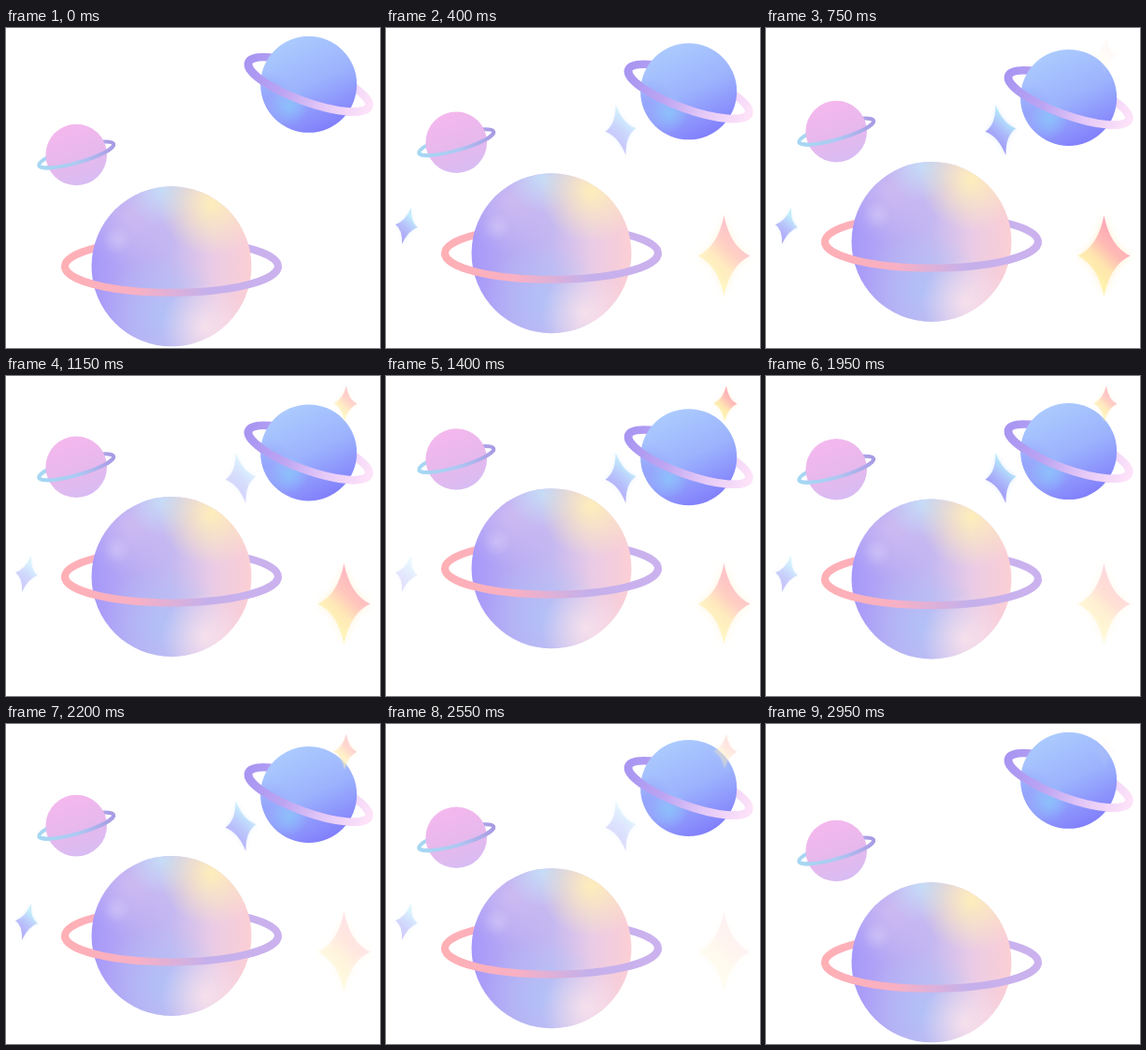
Write an HTML page with a canvas that moves like this. It is 400 px wide and 342 px high and loops after 3000 ms.

```html
<!DOCTYPE html>
<html lang="en">
<head>
<meta charset="utf-8">
<title>Floating planets</title>
<style>
html, body { margin: 0; width: 100%; height: 100%; overflow: hidden; background: #fff; }
canvas { display: block; }
</style>
</head>
<body>
<canvas id="stage" width="400" height="342"></canvas>
<script>
const ctx = document.getElementById('stage').getContext('2d');
const LOOP = 3000, STEP = 50, TURN = 1530, REST = 2950;

// Glows are [x, y, radius, colour] in units of the planet's radius.
const planets = [
  {
    x: 75.2, y: 135.5, r: 32.8, drift: -50.8,
    shade: 70, colors: ['#f4b8ee', '#e8b8ec', '#d8bcf3'], glows: [],
    ring: { rx: 41.5, ry: 8.5, width: 4, tilt: -16, colors: ['#a5d8f3', '#adc8f2', '#a99ae4'] }
  },
  {
    x: 323.7, y: 60.3, r: 51.5, drift: 28.8,
    shade: 65, colors: ['#abcafe', '#9cb3fd', '#817ffb'],
    glows: [[-.9, .3, .6, '#8e96fa90'], [-.4, .45, .4, '#8ac8fac0']],
    ring: { rx: 68.5, ry: 18.5, width: 8.5, tilt: 20, colors: ['#a896f2', '#bda4f2', '#e4c8f7', '#fde2f9'] }
  },
  {
    x: 177, y: 254.8, r: 85.5, drift: -53.7,
    shade: 0, colors: ['#a698fa', '#b7aaf3', '#c4b8f1', '#e9cbe6', '#fccfd4'],
    glows: [
      [-.5, -.65, .65, '#d2bff1c0'], [-.12, -.95, .45, '#c6e4f8d0'],
      [.5, -.78, .65, '#fff0b8f0'], [-.1, .6, .75, '#abc5f9b0'],
      [.42, .75, .55, '#ffe8ecc0'], [-.68, -.33, .18, '#ffffff38']
    ],
    ring: { rx: 114, ry: 28, width: 8, tilt: 0, colors: ['#ffb0b5', '#f8b0c4', '#c5b0eb', '#cbb2ee'] }
  }
];

const cool = ['#9d94f6', '#a9b8fa', '#b2eafa'];
const warm = ['#fff2a2', '#ffe3a8', '#ffb3b0', '#fd9cae'];
const noDip = { at: 0, span: 1, depth: 0 };
const stars = [
  { x: 251, y: 109, w: 16.5, h: 27, lean: 5.5, colors: cool, glow: '#dceaff',
    peak: .95, start: 0, rise: 750, end: 2850, fall: 900, dip: { at: 1150, span: 400, depth: .6 } },
  { x: 22, y: 211.5, w: 12, h: 19.5, lean: -5, colors: cool, glow: '#dceaff',
    peak: .85, start: 0, rise: 450, end: 2850, fall: 600, dip: { at: 1500, span: 900, depth: .8 } },
  { x: 361.5, y: 243.5, w: 28, h: 43.5, lean: 0, colors: warm, glow: '#ffeec4',
    peak: .85, start: 0, rise: 600, end: 2850, fall: 2100, dip: noDip },
  { x: 363, y: 29.5, w: 12.5, h: 19, lean: -1, colors: warm, glow: '#ffeec4',
    peak: .78, start: 700, rise: 700, end: 3000, fall: 1400, dip: noDip }
];

function gradient(x0, y0, x1, y1, colors) {
  const g = ctx.createLinearGradient(x0, y0, x1, y1);
  colors.forEach((c, i) => g.addColorStop(i / (colors.length - 1), c));
  return g;
}

function drawRing({ rx, ry, width, tilt, colors }, start, end) {
  ctx.save();
  ctx.rotate(tilt * Math.PI / 180);
  ctx.lineWidth = width;
  ctx.strokeStyle = gradient(-rx, 0, rx, 0, colors);
  ctx.beginPath();
  ctx.ellipse(0, 0, rx, ry, 0, start, end);
  ctx.stroke();
  ctx.restore();
}

function drawPlanet({ x, y, r, drift, shade, colors, glows, ring }, t) {
  const ax = r * Math.cos(shade * Math.PI / 180);
  const ay = r * Math.sin(shade * Math.PI / 180);
  ctx.save();
  ctx.translate(x, y + drift * Math.min(t / TURN, (REST - t) / (REST - TURN)));
  drawRing(ring, 0, 2 * Math.PI);
  ctx.beginPath();
  ctx.arc(0, 0, r, 0, 2 * Math.PI);
  ctx.fillStyle = gradient(-ax, -ay, ax, ay, colors);
  ctx.fill();
  for (const [gx, gy, size, color] of glows) {
    const g = ctx.createRadialGradient(gx * r, gy * r, 0, gx * r, gy * r, size * r);
    g.addColorStop(0, color);
    g.addColorStop(1, color.slice(0, 7) + '00');
    ctx.fillStyle = g;
    ctx.fill();
  }
  drawRing(ring, 0, Math.PI);
  ctx.restore();
}

function brightness({ peak, start, rise, end, fall, dip }, t) {
  const envelope = Math.min(1, (t - start) / rise, (end - t) / fall);
  const dim = dip.depth * Math.max(0, 1 - Math.abs(t - dip.at) / dip.span);
  return peak * Math.max(0, envelope) * (1 - dim);
}

function drawStar(star, t) {
  const { x, y, w, h, lean, colors, glow } = star;
  const tips = [[-lean, -h], [w, -lean * .3], [lean, h], [-w, lean * .3]];
  ctx.save();
  ctx.translate(x, y);
  ctx.globalAlpha = brightness(star, t);
  ctx.shadowColor = glow;
  ctx.shadowBlur = h / 5;
  ctx.fillStyle = gradient(-w * .6, h * .4, w * .6, -h * .4, colors);
  ctx.beginPath();
  ctx.moveTo(...tips[0]);
  tips.forEach(([px, py], i) => {
    const [nx, ny] = tips[(i + 1) % 4];
    ctx.quadraticCurveTo((px + nx) * .23, (py + ny) * .23, nx, ny);
  });
  ctx.fill();
  ctx.restore();
}

const begin = performance.now();
function tick() {
  const t = Math.floor((performance.now() - begin) % LOOP / STEP) * STEP;
  ctx.clearRect(0, 0, 400, 342);
  planets.forEach(p => drawPlanet(p, t));
  stars.forEach(s => drawStar(s, t));
  requestAnimationFrame(tick);
}
tick();
</script>
</body>
</html>
```
